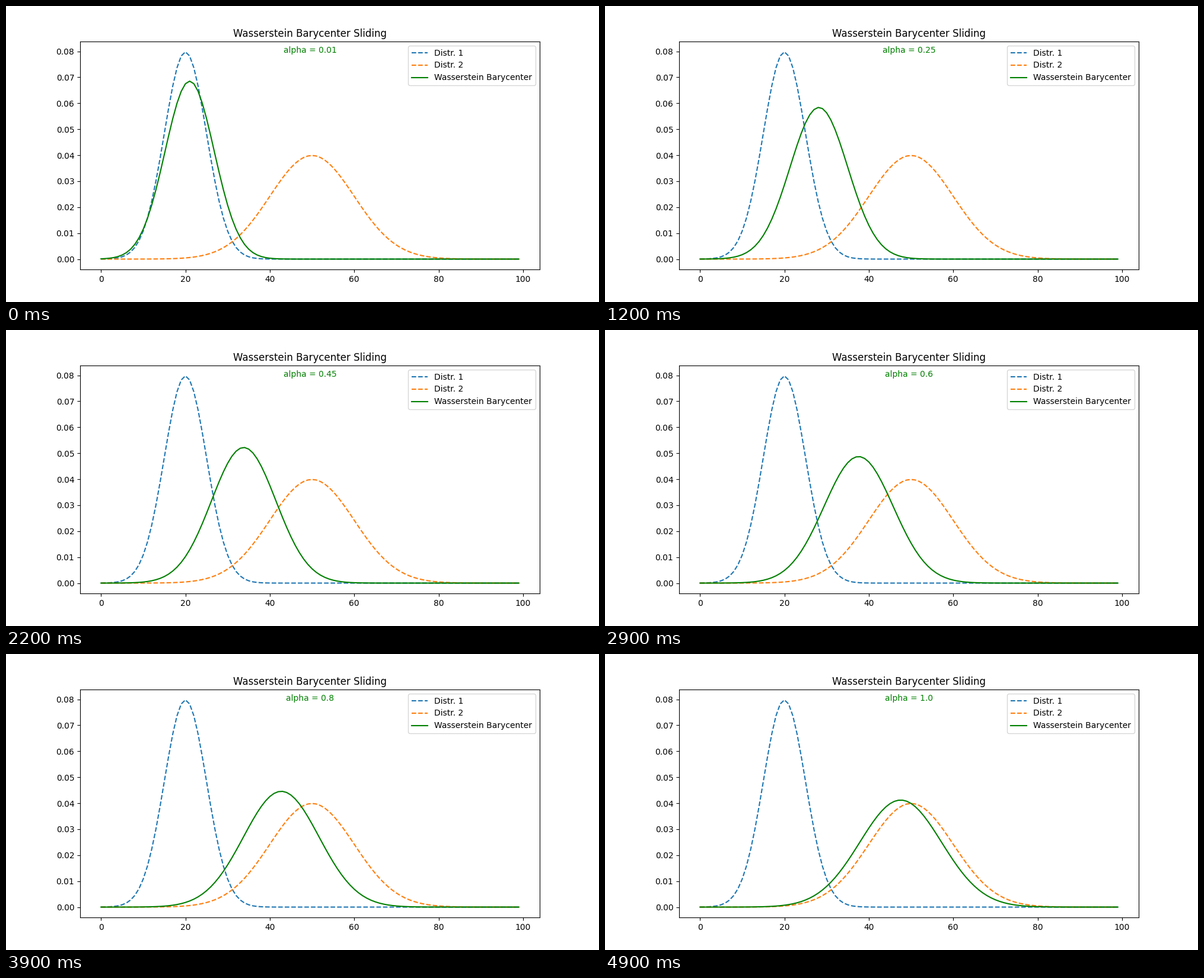
A matplotlib script for the animation above (5000 ms loop, 1000 by 500 pixels).

```python
import numpy as np
import matplotlib.pyplot as plt
from matplotlib.animation import FuncAnimation

N_FRAMES = 50
INTERVAL = 100

x = np.arange(100)
alphas = np.linspace(0.01, 1, N_FRAMES)


def gauss(mean, std):
    y = np.exp(-((x - mean) ** 2) / (2 * std ** 2))
    return y / y.sum()


def barycenter(a):
    """Regularised barycenter of the two bells, as a bell of its own."""
    mean = 20.7 + 30.5 * a - 3.65 * a ** 2
    std = 5.78 + 4.25 * a - 0.35 * a ** 2
    return gauss(mean, std)


plt.rcParams["font.family"] = "DejaVu Sans"
fig, ax = plt.subplots(figsize=(10, 5), dpi=100)
ax.plot(x, gauss(20, 5), "--", color="C0", label="Distr. 1")
ax.plot(x, gauss(50, 10), "--", color="C1", label="Distr. 2")
curve, = ax.plot(x, barycenter(alphas[0]), color="green",
                 label="Wasserstein Barycenter")
label = ax.text(0.5, 0.95, "", color="green", ha="center",
                transform=ax.transAxes)
ax.set_title("Wasserstein Barycenter Sliding")
ax.legend(loc="upper right")


def update(i):
    a = alphas[i]
    curve.set_ydata(barycenter(a))
    label.set_text(f"alpha = {round(float(a), 2)}")
    return curve, label


anim = FuncAnimation(fig, update, frames=N_FRAMES, interval=INTERVAL,
                     repeat=True, repeat_delay=0)
plt.show()
```
